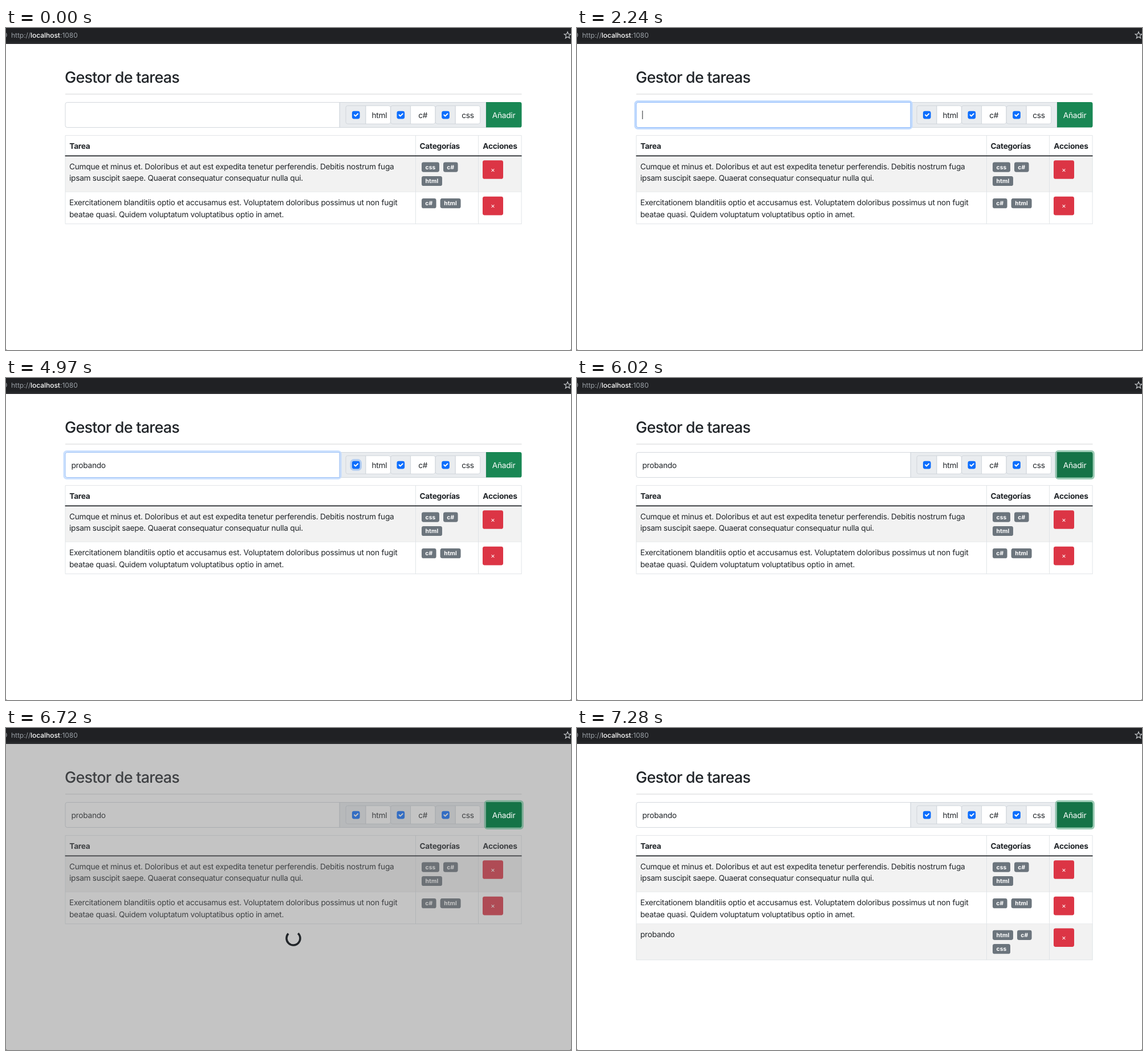
Animation of 991x565 px, one loop 8 s. Source, as an HTML page:

```html
<!DOCTYPE html>
<html lang="es">
<head>
<meta charset="utf-8">
<title>Gestor de tareas</title>
<style>
html, body { margin: 0; width: 100%; height: 100%; overflow: hidden; background: #fff; }
svg {
  display: block; width: 100%; height: 100%;
  font: 13.7px Inter, Roboto, sans-serif; letter-spacing: -.262px;
  font-optical-sizing: none; text-rendering: geometricPrecision;
  --ink: #212529; --line: #dee2e6; --edge: #ced4da; --addon: #e9ecef;
}
text { fill: var(--ink); white-space: pre; }
.bold { font-weight: 700; }
.title { font-size: 27px; font-weight: 500; letter-spacing: -.8px; }
.url { font-size: 12px; letter-spacing: -.03px; fill: #9aa0a6; }
.host { fill: #fff; font-weight: 500; }
.tag { font-size: 10.3px; font-weight: 700; letter-spacing: .1px; fill: #fff; text-anchor: middle; }
.cross { font-size: 11.9px; letter-spacing: 0; fill: #fff; text-anchor: middle; }
.white { fill: #fff; }
</style>
</head>
<body>
<svg id="stage" viewBox="0 0 991 565" preserveAspectRatio="none"></svg>
<script>
const LOOP = 8000, STEP = 70;
const TYPED = 'probando';
const KEY_TIMES = [3080, 3220, 3360, 3500, 3780, 4130, 4410, 4620];
const FOCUS = 2030, BLUR = 4970, BUTTON_FOCUS = 5740, LOAD = 6160, DONE = 7280;
const TABS = [BLUR, 5110, 5250, BUTTON_FOCUS];
const TEXT_X = 114.5;

const stage = document.getElementById('stage');

const text = (x, y, s, cls = '', id = '') =>
  `<text x="${x}" y="${y}" class="${cls}" id="${id}">${s}</text>`;
const rect = (x, y, w, h, fill, r = 0, extra = '') =>
  `<rect x="${x}" y="${y}" width="${w}" height="${h}" rx="${r}" fill="${fill}" ${extra}/>`;
const path = (d, fill, extra = '') => `<path d="${d}" fill="${fill}" ${extra}/>`;
const line = (d, color, w = .9) => path(d, 'none', `stroke="${color}" stroke-width="${w}"`);
const edge = 'stroke="var(--edge)" stroke-width=".9"';

// Box rounded on the left or right side only
const leftBox = (x, y, w, h, r = 3.4) =>
  `M${x + w} ${y}H${x + r}a${r} ${r} 0 0 0 ${-r} ${r}V${y + h - r}a${r} ${r} 0 0 0 ${r} ${r}H${x + w}Z`;
const rightBox = (x, y, w, h, r = 3.4) =>
  `M${x} ${y}H${x + w - r}a${r} ${r} 0 0 1 ${r} ${r}V${y + h - r}a${r} ${r} 0 0 1 ${-r} ${r}H${x}Z`;

const TAG_WIDTH = { css: 31, 'c#': 25.6, html: 36 };

function tags(y, rows) {
  return rows.map((row, i) => {
    let x = 729;
    return row.map(name => {
      const w = TAG_WIDTH[name], top = y + i * 24.4;
      const out = rect(x, top, w, 17.2, '#6c757d', 3.4) + text(x + w / 2, top + 12.2, name, 'tag');
      x += w + 7;
      return out;
    }).join('');
  }).join('');
}

function row(y, h, lines, names, striped) {
  return rect(104, y, 800.5, h, striped ? '#f2f2f2' : '#fff') +
    lines.map((s, i) => text(111, y + 23 + i * 20.5, s)).join('') +
    tags(y + 11, names) +
    rect(836, y + 7.7, 36, 32.6, '#dc3545', 3.4) + text(854, y + 28.3, '×', 'cross') +
    line(`M104 ${y + h}H904.5M104 ${y}V${y + h}M718.5 ${y}V${y + h}M828.5 ${y}V${y + h}M904.1 ${y}V${y + h}`, 'var(--line)');
}

function option(x, name, textX, i) {
  return path(leftBox(x, 136.3, 35, 32), 'var(--addon)', edge) +
    path(rightBox(x + 35, 136.3, 43.4, 32), '#fff', edge) +
    `<g transform="translate(${x + 10.9} 145.7)">` +
    rect(-1.7, -1.7, 17.1, 17.1, 'none', 5, `id="ring${i}" stroke="#0d6efd" stroke-opacity=".25" stroke-width="3.4"`) +
    rect(0, 0, 13.7, 13.7, '#0d6efd', 3.4) +
    path('M4.1 6.85l2.05 2.05l4.1-4.1', 'none', 'stroke="#fff" stroke-width="2" stroke-linecap="round" stroke-linejoin="round"') +
    '</g>' + text(textX, 157.5, name);
}

function star(cx, cy, outer, inner) {
  const pts = Array.from({ length: 10 }, (_, i) => {
    const a = (i * 36 - 90) * Math.PI / 180, r = i % 2 ? inner : outer;
    return `${(cx + r * Math.cos(a)).toFixed(2)} ${(cy + r * Math.sin(a)).toFixed(2)}`;
  });
  return path(`M${pts.join('L')}Z`, 'none', 'stroke="#c4c7ca" stroke-width="1.2"');
}

stage.innerHTML =
  rect(0, 0, 991, 565, '#fff') +
  // browser bar
  rect(0, 0, 991, 28, '#28292c') + rect(0, 0, 991, 24.3, '#202124') +
  '<circle cx="-3.6" cy="12.3" r="4.8" fill="none" stroke="#9aa0a6" stroke-width="1.2"/>' +
  text(9, 16.5, 'http://', 'url') + text(43, 16.5, 'localhost', 'url host') + text(95, 16.5, ':1080', 'url') +
  star(985, 12.8, 6.2, 2.7) +
  // heading
  text(103, 96, 'Gestor de tareas', 'title') + line('M104 116H904.5', '#cfd0d1') +
  // form
  rect(585, 130.5, 257, 44, 'var(--addon)', 0, edge) +
  option(596, 'html', 641.5, 0) + option(674.6, 'c#', 723.3, 1) + option(753.3, 'css', 799.3, 2) +
  path(leftBox(104, 130.5, 481, 44), '#fff', edge) +
  `<g id="inputFocus">${rect(102.1, 128.6, 484.9, 47.8, 'none', 4.5, 'stroke="#c2dbfe" stroke-width="3.4"')}` +
  path(leftBox(104, 130.5, 481, 44), '#fff', 'stroke="#86b7fe" stroke-width=".9"') + '</g>' +
  text(TEXT_X, 157.5, '', '', 'field') + rect(0, 145, 1, 15, '#212529', 0, 'id="caret"') +
  // table
  line('M104 224V188.6H904.1V224M718.5 188.6V224M828.5 188.6V224', 'var(--line)') +
  text(111.3, 211.5, 'Tarea', 'bold') + text(725.5, 211.5, 'Categorías', 'bold') + text(836.3, 211.5, 'Acciones', 'bold') +
  row(224.5, 63.6, ['Cumque et minus et. Doloribus et aut est expedita tenetur perferendis. Debitis nostrum fuga',
    'ipsam suscipit saepe. Quaerat consequatur consequatur nulla qui.'], [['css', 'c#'], ['html']], true) +
  row(288.1, 55.6, ['Exercitationem blanditiis optio et accusamus est. Voluptatem doloribus possimus ut non fugit',
    'beatae quasi. Quidem voluptatum voluptatibus optio in amet.'], [['c#', 'html']], false) +
  `<g id="added">${row(343.7, 63.2, [TYPED], [['html', 'c#'], ['css']], true)}</g>` +
  line('M103.6 224.3H904.5', 'var(--ink)', 1.7) +
  // loading overlay with a spinner open on its right quarter
  `<g id="overlay">${rect(0, 28, 991, 537, '#6b6b6b', 0, 'fill-opacity=".4"')}` +
  path('M8.49 8.49A12 12 0 1 1 8.49 -8.49', 'none', 'id="spinner" stroke="#212529" stroke-width="3.5"') + '</g>' +
  // the button stays above the overlay
  path(rightBox(842, 130, 62.5, 44.6), '#198754') +
  `<g id="buttonFocus">${rect(840.3, 128.5, 65.9, 47.8, 'none', 4, 'stroke="#3c996e" stroke-opacity=".5" stroke-width="3.4"')}` +
  path(rightBox(842, 130, 62.5, 44.6), '#157347') + '</g>' +
  text(852.8, 157.5, 'Añadir', 'white') +
  // window corners
  path('M0 562.5Q0 565 2.5 565H0Z', '#555') + path('M991 562.5Q991 565 988.5 565H991Z', '#555');

const $ = id => document.getElementById(id);
const field = $('field'), caret = $('caret'), spinner = $('spinner');
const show = (el, on) => el.setAttribute('visibility', on ? 'visible' : 'hidden');

// 150 ms ease-in-out fade that begins shortly before its first visible step
function fade(t, start) {
  const p = Math.min(1, Math.max(0, (t - start + 40) / 150));
  return t < start ? 0 : p * p * (3 - 2 * p);
}

function draw(ms) {
  const t = Math.floor(ms / STEP) * STEP;

  $('inputFocus').setAttribute('opacity', fade(t, FOCUS) - fade(t, BLUR));
  $('buttonFocus').setAttribute('opacity', fade(t, BUTTON_FOCUS));
  for (let i = 0; i < 3; i++) show($('ring' + i), t >= TABS[i] && t < TABS[i + 1]);

  field.textContent = TYPED.slice(0, KEY_TIMES.filter(k => t >= k).length);
  const width = field.textContent ? field.getComputedTextLength() : 0;
  caret.setAttribute('x', TEXT_X + width - .1);
  show(caret, (t >= FOCUS && t < 2520) || (t >= KEY_TIMES[0] && t < BLUR));

  show($('overlay'), t >= LOAD && t < DONE);
  spinner.setAttribute('transform', `translate(504 369) rotate(${10 + (t - LOAD) * .461})`);
  show($('added'), t >= DONE);
}

const begin = performance.now();
function tick() {
  draw((performance.now() - begin) % LOOP);
  requestAnimationFrame(tick);
}
tick();
</script>
</body>
</html>
```
